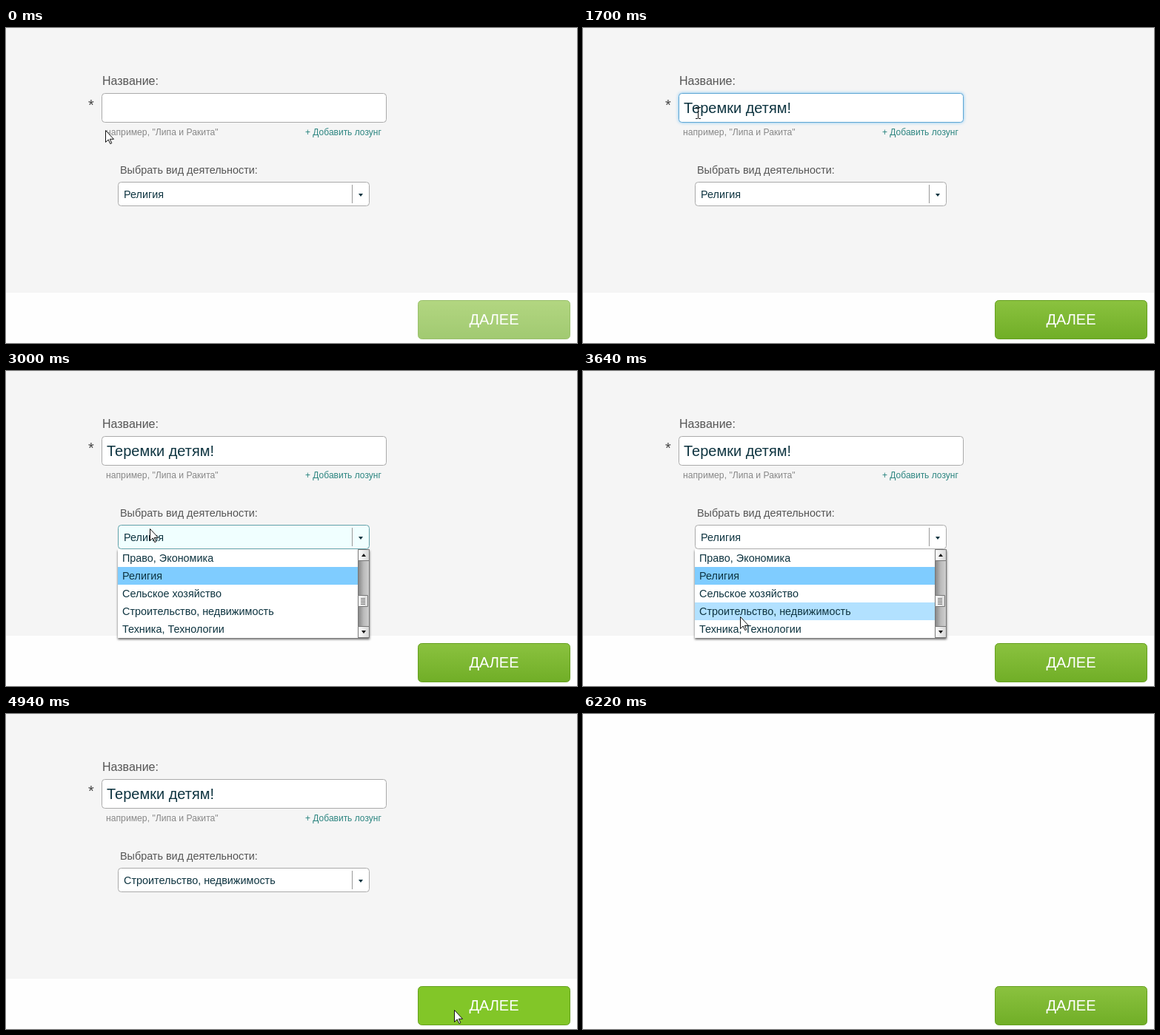
An HTML page for the animation above (6650 ms loop, 771 by 426 pixels).

```html
<!DOCTYPE html>
<html lang="ru">
<head>
<meta charset="utf-8">
<title>Форма</title>
<style>
html, body { margin: 0; width: 100%; height: 100%; overflow: hidden; background: #fefefe; }
svg { display: block; font: 14.4px "Liberation Sans", Arial, sans-serif; fill: #0e3440; }
.label { fill: #555; }
.box { fill: #fff; stroke: #aaa; }
.focus { stroke: #5fa6d3; filter: drop-shadow(0 0 2px #7cc4f4); }
.hover { fill: #f0ffff; stroke: #62a0a8; }
#list { filter: drop-shadow(0 2px 1.5px #0009); }
</style>
</head>
<body>
<svg width="771" height="426" viewBox="0 0 771 426">
  <defs>
    <linearGradient id="green" x2="0" y2="1">
      <stop stop-color="#8bc23f"/><stop offset="1" stop-color="#70ae27"/>
    </linearGradient>
    <linearGradient id="track">
      <stop stop-color="#858585"/><stop offset=".5" stop-color="#bbb"/><stop offset="1" stop-color="#d0d0d0"/>
    </linearGradient>
    <linearGradient id="knob">
      <stop stop-color="#fff"/><stop offset="1" stop-color="#d4d4d4"/>
    </linearGradient>
    <clipPath id="below"><path d="M140 241h360v140h-360z"/></clipPath>
  </defs>

  <g id="form">
    <path fill="#f5f5f5" d="M0 0h771v358H0z"/>
    <text class="label" x="130" y="77" font-size="16">Название:</text>
    <text x="111" y="111" font-size="20" fill="#444">*</text>
    <rect id="field" class="box" x="129.5" y="88.5" width="384" height="39" rx="4"/>
    <text id="name" x="136" y="115" font-size="20">Теремки детям!</text>
    <path id="caret" stroke="#111" d="M.5 96v24"/>
    <text x="135" y="145" font-size="12.2" fill="#888">например, "Липа и Ракита"</text>
    <text x="404" y="145" font-size="12" fill="#2c8580">+ Добавить лозунг</text>
    <text class="label" x="154" y="197">Выбрать вид деятельности:</text>

    <g clip-path="url(#below)">
      <g id="list">
        <path fill="#fff" d="M151 241h340v120H151z"/>
        <g id="rows"></g>
        <path fill="url(#track)" stroke="#777" d="M475.5 241.5h15v119h-15z"/>
        <path fill="url(#knob)" stroke="#777" d="M475.5 241.5h15v15h-15zM475.5 345.5h15v15h-15zM475.5 303.5h13v15h-13z"/>
        <path fill="#111" d="M480 251h6l-3-4zM480 351h6l-3 4z"/>
        <path stroke="#777" d="M479 307.5h6m-6 2h6m-6 2h6m-6 2h6m-6 2h6"/>
      </g>
    </g>

    <rect id="select" class="box" x="151.5" y="208.5" width="339" height="32" rx="4"/>
    <path stroke="#999" d="M467.5 212v25"/>
    <path d="M476 224h6l-3 4z"/>
    <text id="choice" x="159" y="230"></text>
  </g>

  <rect id="button" x="556.5" y="368.5" width="205" height="52" rx="5" stroke="#66a021"/>
  <text x="659" y="401" font-size="20" fill="#fff" text-anchor="middle">ДАЛЕЕ</text>

  <g id="cursor">
    <path id="arrow" fill="#fff" stroke="#111" d="M.5.5v16l3.7-3.5 2.6 5.6 2-.9-2.5-5.4h5.2z"/>
    <path id="beam" fill="none" stroke="#111" d="M0 .5h3m1 0h3M3.5 1v14M0 15.5h3m1 0h3"/>
    <g id="busy" fill="none" stroke-width="4">
      <circle cx="10.5" cy="10.5" r="8" stroke="#3a9fc4"/>
      <path id="glint" stroke="#c5effa" d="M10.5 2.5a8 8 0 0 1 8 8"/>
    </g>
  </g>
</svg>
<script>
const LOOP = 6650;
const $ = id => document.getElementById(id);
const show = (id, on) => $(id).setAttribute('display', on ? 'inline' : 'none');
const set = (id, name, value) => $(id).setAttribute(name, value);

const items = ['Право, Экономика', 'Религия', 'Сельское хозяйство',
  'Строительство, недвижимость', 'Техника, Технологии'];
$('rows').innerHTML = items.map((item, i) =>
  `<rect id="row${i}" x="151" y="${241 + 24 * i}" width="324" height="24"/>
   <text x="157" y="${258 + 24 * i}">${item}</text>`).join('');

// Each step: start time, then its values
const cursorSteps = [
  [0, 'arrow', 134, 138], [200, 'beam', 151, 110], [420, 'beam', 152, 107],
  [2350, 'arrow', 188, 200], [2570, 'arrow', 194, 213], [3440, 'arrow', 209, 320],
  [3640, 'arrow', 212, 332], [4080, 'arrow', 212, 331], [4730, 'arrow', 513, 390],
  [4940, 'arrow', 605, 400], [5160, 'none', 0, 0], [5370, 'busy', 597, 391],
  [6020, 'arrow', 605, 400], [6220, 'none', 0, 0]
];
const listSteps = [[0, -140], [2780, -115], [3000, 0], [4300, -106], [4510, -140]];
const fadeSteps = [[0, 1], [5590, .94], [5800, .08], [6020, 0]];
const at = (steps, t) => steps.findLast(step => t >= step[0]).slice(1);

function draw(now) {
  const t = now % LOOP;
  const during = (from, to) => t >= from && t < to;

  const typed = t >= 1700;
  set('field', 'class', during(860, 2780) ? 'box focus' : 'box');
  show('name', typed);
  show('caret', during(860, 1060) || during(1490, 1700) || during(2140, 2570));
  set('caret', 'transform', `translate(${typed ? 283 : 137})`);

  set('select', 'class', during(2570, 3440) ? 'box hover' : 'box');
  $('choice').textContent = items[t < 4300 ? 1 : 3];
  const [slide] = at(listSteps, t);
  show('list', slide > -140);
  set('list', 'transform', `translate(0 ${slide})`);
  const chosen = t < 4080 ? 1 : 3;
  items.forEach((_, i) => set('row' + i, 'fill',
    i === chosen ? '#7fccff' : i === 3 && t >= 3440 ? '#b2e1ff' : '#fff'));

  set('form', 'opacity', at(fadeSteps, t)[0]);
  set('button', 'fill', during(4940, 6220) ? '#82c628' : 'url(#green)');
  set('button', 'opacity', typed ? 1 : .65);

  const [shape, x, y] = at(cursorSteps, t);
  for (const id of ['arrow', 'beam', 'busy']) show(id, id === shape);
  set('cursor', 'transform', `translate(${x} ${y})`);
  set('glint', 'transform', `rotate(${t < 5590 ? 0 : 140} 10.5 10.5)`);
  requestAnimationFrame(draw);
}
requestAnimationFrame(draw);
</script>
</body>
</html>
```
